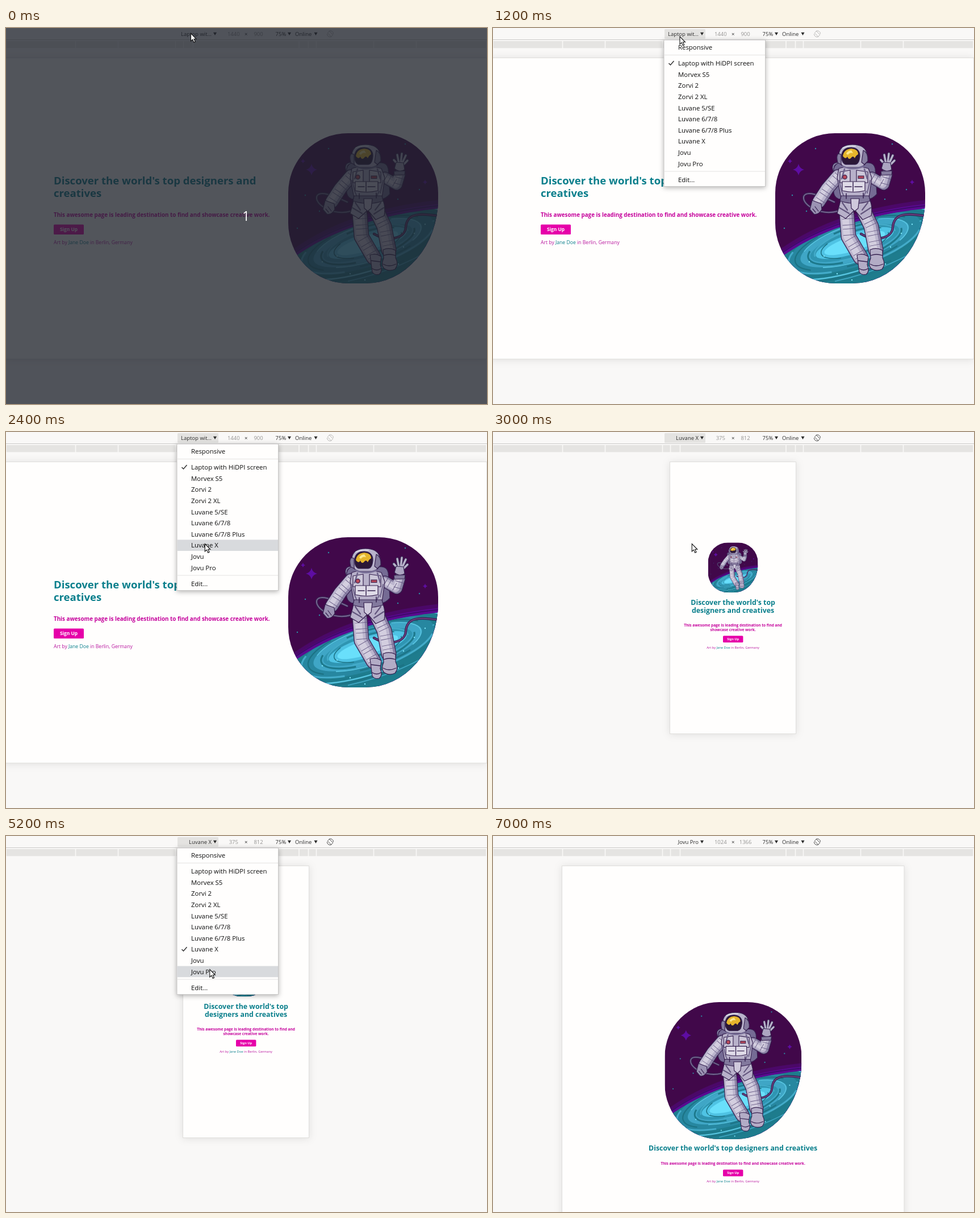
Animation, 847 px wide and 661 px high, one loop 7.1 s. Source, as an HTML page:

```html
<!DOCTYPE html>
<html lang="en">
<head>
<meta charset="utf-8">
<title>Responsive page preview</title>
<style>
  html, body { margin: 0; height: 100%; overflow: hidden; background: #f9f8f7; }
  svg { display: block; width: 100vw; height: 100vh; font-family: "Open Sans", "Noto Sans", sans-serif; }
  .bar { font-size: 9.5px; font-weight: 500; fill: #2b2b2b; }
  .bar .dim { fill: #949392; text-anchor: middle; }
  .end { text-anchor: end; }
  .mid { text-anchor: middle; }
  .sheet { fill: #fffefd; stroke: #dfdedc; filter: drop-shadow(0 1px 7px rgba(0, 0, 0, .1)); }
  .head { font-weight: 700; fill: #0a7f8c; }
  .sub { font-weight: 700; fill: #c5009b; }
  .label { font-weight: 700; fill: #fff; text-anchor: middle; }
  .credit { fill: #b9179f; }
  .credit tspan { fill: #0a7f8c; }
  .menu { font-size: 11.4px; font-weight: 500; fill: #0c0c0c; }
  .menu .box { fill: #fffefd; stroke: #c9c8c7; filter: drop-shadow(0 2px 4px rgba(0, 0, 0, .3)); }
  .line { fill: none; stroke-linecap: round; stroke-linejoin: round; }
  .ink { stroke: #35204f; stroke-width: 1.2; stroke-linejoin: round; }
</style>
</head>
<body>
<svg id="stage" viewBox="0 0 847 661"></svg>
<script>
const LOOP = 7100;
const INK = '#35204f';

const line = (d, color, width, extra = '') =>
  `<path class="line" d="${d}" stroke="${color}" stroke-width="${width}" ${extra}/>`;

const shape = (d, fill) => `<path class="ink" d="${d}" fill="${fill}"/>`;

const dot = (x, y, r, fill) => `<circle cx="${x}" cy="${y}" r="${r}" fill="${fill}"/>`;

const text = (x, y, content, cls = '', size = '') =>
  `<text x="${x}" y="${y}" class="${cls}" ${size && `font-size="${size}"`}>${content}</text>`;

const tube = (d, color) => line(d, INK, 4.4) + line(d, color, 2);

// A padded suit limb: outline, shaded body, lit side and uneven creases across it.
const limb = (d, w) =>
  line(d, INK, w) + line(d, '#8b82a6', w - 2.4) +
  line(d, '#bcb6ce', w - 7, 'transform="translate(-2 -.5)"') +
  line(d, '#d3cedf', w - 15, 'transform="translate(-3 -.5)"') +
  line(d, '#655883', w - 6, 'stroke-dasharray=".9 6 .9 10" style="stroke-linecap:butt" transform="translate(1.5 0)"');

const sparkle = (x, y, r) =>
  `<path fill="#5e0da3" d="M${x} ${y - r}Q${x + r * .2} ${y - r * .2} ${x + r} ${y}Q${x + r * .2} ${y + r * .2} ${x} ${y + r}` +
  `Q${x - r * .2} ${y + r * .2} ${x - r} ${y}Q${x - r * .2} ${y - r * .2} ${x} ${y - r}Z"/>`;

function space() {
  const rim = 'M490 416Q590 335 765 317V455H490Z';
  const oval = (rx, ry, paint) => `<ellipse cx="637" cy="378" rx="${rx}" ry="${ry}" ${paint}/>`;
  let swirl = oval(122, 41, 'fill="#2787a0"') + oval(100, 31, 'fill="#3fa6c6"') +
    oval(82, 23, 'fill="#2f95b2"') + oval(72, 18, 'fill="#4fc3e4"') + oval(56, 13, 'fill="#69dffb"');
  const colors = ['#1c7385', '#43abc9', '#1d798c', '#59c6e2'];
  for (let i = 0; i < 11; i++) {
    const rx = 62 + i * 12;
    swirl += oval(rx, rx * .33, `fill="none" stroke="${colors[i % 4]}" stroke-width="${1.6 + i % 3 * .8}"
      stroke-dasharray="${60 + i * 9} ${40 + i * 6}" stroke-dashoffset="${i * 67}"`);
  }
  const stars = [[527, 294], [513, 352], [703, 204], [728, 284], [568, 212], [552, 322], [690, 301]];
  const specks = [[583, 401], [606, 432], [632, 443], [700, 385], [719, 361], [691, 415], [557, 411], [738, 345]];
  return `<rect x="497" y="185" width="264" height="264" fill="#41084a"/>
    <path d="${rim}" fill="#4b0868" transform="translate(0 -15)"/>
    <path d="${rim}" fill="#5a0a90" transform="translate(0 -8)"/>
    ${line('M500 402Q595 329 765 312', '#3d0a68', 2)}
    <path d="${rim}" fill="#1e7c8d"/>
    <clipPath id="planet"><path d="${rim}"/></clipPath>
    <g clip-path="url(#planet)"><g transform="rotate(-18 637 378)">${swirl}</g></g>
    ${sparkle(538, 249, 10)}${sparkle(523, 234, 4)}${sparkle(738, 271, 4.5)}
    ${stars.map(([x, y]) => dot(x, y, 1.2, '#2b8fa5')).join('')}
    ${specks.map(([x, y]) => dot(x, y, 1.2, '#7be4f5')).join('')}`;
}

function astronaut() {
  const fingers = 'M693 243L683 232M692 239L689 223M695 238L697 221M697 239L704 224M698 242L707 233';
  return tube('M607 322C577 330 545 312 547 297C550 284 578 295 601 306', '#75648f') +
    tube('M612 262C594 250 597 237 608 238', '#8d84a8') +
    tube('M648 362C672 376 703 371 704 350C706 327 724 324 765 331', '#6a3f80') +
    shape('M600 247Q603 237 612 237H662Q671 238 673 247L676 292Q668 301 660 301H612Q602 300 600 290Z', '#756b94') +
    limb('M608 260L589 282L574 305', 24) +
    limb('M667 263L688 275L693 258', 21) +
    line(fingers, INK, 5.6) + line(fingers, '#b9b3cb', 3.4) +
    shape('M684 247L687 236L700 237L702 249Q693 255 684 247Z', '#aca5c1') +
    shape('M683 252L703 251L702 258L684 259Z', '#857c9f') +
    shape('M562 303L578 309L579 319Q573 329 565 327L558 319Z', '#9b93b3') +
    line('M563 318L568 324M567 314L573 322', INK, 1.2) +
    limb('M654 324L666 349L674 390', 27) +
    limb('M623 328L626 367L647 403', 27) +
    shape('M664 390Q675 385 686 391L686 404Q692 416 685 424Q674 429 665 422Q660 416 665 405Z', '#b3acc6') +
    shape('M641 399Q651 395 661 402L659 416Q664 428 657 433Q649 435 645 429L643 414Z', '#b3acc6') +
    line('M664 415Q674 421 687 415M645 423Q653 428 660 423M665 400Q675 396 686 400M643 409L659 411', INK, 1.3) +
    shape('M609 247Q634 239 661 247L667 263L662 299Q669 312 666 330L651 337L637 320L621 335L606 326Q610 312 613 299L606 263Z', '#b8b1ca') +
    line('M609 268L615 290M664 268L659 290M614 287L620 301M657 287L650 301', '#6f648c', 2) +
    shape('M613 295L662 295L664 304Q638 313 611 304Z', '#82799d') +
    shape('M630 300H645L643 317L637 322L631 317Z', '#cfc9dc') +
    line('M610 316L627 326M665 316L648 327M615 307L624 320M660 307L650 320', '#64577f', 2.2) +
    shape('M611 253L629 250V272H611ZM640 250L660 253V272H640Z', '#ccc7d9') +
    shape('M615 270H655V286Q635 291 615 286Z', '#dfdbe8') +
    line('M620 279H631M637 279H650M634 271V287M622 291V300M652 290V299', INK, 1.5) +
    line('M619 248L614 265M654 248L659 265', '#6f648c', 2.6) +
    dot(619.5, 262, 4.3, INK) + dot(619.5, 262, 3.1, '#b94a5b') +
    `<rect x="643" y="260" width="10" height="4.5" fill="#b14659" stroke="${INK}"/>` +
    shape('M609 222Q611 205 633 205Q657 205 659 224Q660 242 645 245H621Q608 241 609 222Z', '#b9b3cb') +
    line('M616 211Q624 206.5 638 207.5', '#e2dfea', 1.8) +
    shape('M608 221Q604 224 607 237L613 240V222ZM652 215Q661 219 660 234L654 240L649 236Z', '#857c9f') +
    shape('M614 223Q616 210 631 210Q646 211 646 225Q645 239 638 240H621Q613 237 614 223Z', '#2b1737') +
    '<path fill="#e5b52c" d="M616 225Q618 213 631 212Q643 213 643 222Q639 224 637 229Q634 223 630 229Q626 232 624 226Q621 232 616 225Z"/>' +
    '<path fill="#fbe78d" d="M622 221Q624 216 631 215L634 220Q628 218 625 223Z"/>' +
    line('M616 243Q633 251 652 243', '#756b94', 3);
}

const artwork = `<defs>
  <clipPath id="blob"><path d="M602 185H656A105 105 0 0 1 761 290V300A128 149 0 0 1 633 449H603A106 106 0 0 1 497 343V290A105 105 0 0 1 602 185Z"/></clipPath>
  <g id="art" clip-path="url(#blob)">${space()}${astronaut()}</g></defs>`;

function page(p) {
  const align = p.centered ? 'mid' : '';
  const rows = (list, cls, size) => list.map(([y, s]) => text(p.textX, y, s, `${cls} ${align}`, size)).join('');
  const [bx, by, bw, bh] = p.button;
  const [ax, ay, scale] = p.art;
  return `<g class="page">
    <rect class="sheet" x="${p.sheet[0]}" y="52.5" width="${p.sheet[1]}" height="${p.sheet[2]}"/>
    <use href="#art" transform="translate(${ax} ${ay}) scale(${scale}) translate(-497 -185)"/>
    ${rows(p.head, 'head', p.sizes[0])}${rows(p.sub, 'sub', p.sizes[1])}
    <rect x="${bx}" y="${by}" width="${bw}" height="${bh}" rx="1.5" fill="#e600a9"/>
    ${text(bx + bw / 2, by + bh / 2 + p.sizes[2] * .36, 'Sign Up', 'label', p.sizes[2])}
    ${rows([[p.creditY, 'Art by <tspan>Jane Doe</tspan> in Berlin, Germany']], 'credit', p.sizes[3])}
  </g>`;
}

const small = { centered: true, textX: 422.6, sizes: [12.38, 6.56, 5.65, 5.78] };
const pages = [
  { sheet: [-4, 850.5, 529.5], art: [497, 185, 1], textX: 84, sizes: [18.56, 9.81, 8.4, 8.63],
    head: [[274.5, "Discover the world's top designers and"], [296.5, 'creatives']],
    sub: [[332.3, 'This awesome page is leading destination to find and showcase creative work.']],
    button: [84, 345.5, 53, 17.5], creditY: 380.3 },
  { ...small, sheet: [311.5, 222, 478], art: [378.6, 194.3, .3333],
    head: [[303.5, "Discover the world's top"], [317.7, 'designers and creatives']],
    sub: [[341.7, 'This awesome page is leading destination to find and'], [349.7, 'showcase creative work.']],
    button: [405, 358.3, 35.4, 11.7], creditY: 381.2 },
  { ...small, sheet: [121.5, 602.5, 640], art: [302.4, 292, .913],
    head: [[553.3, "Discover the world's top designers and creatives"]],
    sub: [[577.9, 'This awesome page is leading destination to find and showcase creative work.']],
    button: [405, 586.5, 35.4, 11.7], creditY: 609.2 },
];

const devices = ['Laptop with HiDPI screen', 'Morvex S5', 'Zorvi 2', 'Zorvi 2 XL', 'Luvane 5/SE',
  'Luvane 6/7/8', 'Luvane 6/7/8 Plus', 'Luvane X', 'Jovu', 'Jovu Pro'];
const RESPONSIVE = -1, NONE = -2;
const rowY = i => i === RESPONSIVE ? 33.6 : 62 + i * 19.6;

const screens = [
  { name: 'Laptop wit…', size: [1440, 900], row: 0, icon: '#b5b4b3' },
  { name: 'Luvane X', size: [375, 812], row: 7, icon: '#444' },
  { name: 'Jovu Pro', size: [1024, 1366], row: 9, icon: '#444' },
];

const ruler = [0, 122.5, 197.5, 298.5, 312.5, 329.5, 516, 532.5, 546.5, 647.5, 722.5, 846];
const arrow = x => `<path d="M${x - 3} 7.8H${x + 3}L${x} 13Z"/>`;

const toolbar = `<g class="bar">
  <path d="M0 20.5H847" stroke="#cbcac9"/>
  ${ruler.slice(1).map((x, i) => `<rect x="${ruler[i] + .8}" y="23" width="${x - ruler[i] - 1.6}" height="12.3" fill="#e5e4e2"/>`).join('')}
  <rect id="hover" x="302" y="2" width="72" height="17" rx="1.5" fill="#e4e3e1"/>
  <text id="device" class="end" x="362" y="14"></text>${arrow(368)}
  <text id="width" class="dim" x="400.8" y="14"></text>${text(422.7, 14, '×', 'mid')}
  <text id="height" class="dim" x="444.6" y="14"></text>
  ${text(493.3, 14, '75%', 'end')}${arrow(499)}${text(538.3, 14, 'Online', 'end')}${arrow(545.5)}
  <g id="rotate" fill="none" stroke-width=".9" transform="rotate(45 571 10.3)">
    <rect x="566.4" y="8" width="9.2" height="4.6" rx="1"/>
    <path d="M566 8.5A5.3 5.3 0 0 1 575 6.5M576 12.2A5.3 5.3 0 0 1 567 14.2"/>
  </g></g>`;

const menu = `<g id="menu" class="menu">
  <rect class="box" x="301" y="21" width="178.5" height="257.5"/>
  <rect id="row" x="301.5" width="177.5" height="19.6" fill="#d8dadd"/>
  <path d="M301.5 47.5H479M301.5 252H479" stroke="#e3e2e1"/>
  ${text(326, 37.8, 'Responsive')}${text(326, 270.6, 'Edit…')}
  ${devices.map((name, i) => text(326, rowY(i) + 4.1, name)).join('')}
  <path id="check" d="M309.5 0L312.5 3L318.5 -4" fill="none" stroke="#333" stroke-width="1.5"/></g>`;

const stage = document.getElementById('stage');
stage.innerHTML = artwork + pages.map(page).join('') + toolbar + menu +
  `<g id="intro"><rect width="847" height="661" fill="#1e222b" fill-opacity=".77"/>
   ${text(422.5, 339, '1', 'mid', 23).replace('<text', '<text fill="#fff"')}</g>
   <path id="cursor" d="M0 0V13.4L3.1 10.6L5.4 15.8L7.7 14.8L5.5 9.8H9.5Z" fill="#fff" stroke="#111" stroke-width="1.1"/>`;

const part = Object.fromEntries([...stage.querySelectorAll('[id]')].map(el => [el.id, el]));
const pageNodes = [...stage.querySelectorAll('.page')];

// Each timeline holds [start in ms, value...] and jumps from entry to entry.
const cursorPath = [
  [0, 325.5, 9.5], [1200, 329, 15], [1300, 332, 25], [1500, 334, 50], [1600, 336, 88], [1700, 338.5, 128.5],
  [1800, 344, 171], [2000, 347, 204], [2300, 349, 200], [2400, 350.3, 196.5], [3300, 352, 184], [3400, 353.5, 165],
  [3600, 360, 130], [3700, 366, 85], [3800, 370, 45], [4000, 368, 30], [4100, 362, 17], [4200, 356.8, 8.8],
  [4800, 354, 80], [4900, 352, 172], [5100, 356, 210], [5200, 358.8, 234.5], [6200, 300, 190], [6300, 220, 130],
  [6400, 150, 75], [6500, 100, 30], [6600, 72, 5], [6900, 72, 3], [7000, -50, -50],
];
const highlights = [[0, NONE], [1300, RESPONSIVE], [1500, 1], [1600, 3], [1700, 5], [1800, 7], [2000, 8], [2300, 7],
  [2900, NONE], [4800, 3], [4900, 7], [5100, 8], [5200, 9], [5700, NONE]];
const screenTimes = [[0, 0], [3000, 1], [5800, 2]];
const menuTimes = [[0, false], [600, true], [2900, false], [4400, true], [5700, false]];

const at = (timeline, t) => timeline.findLast(entry => entry[0] <= t).slice(1);
const show = (el, visible) => el.setAttribute('visibility', visible ? 'visible' : 'hidden');

function draw(t) {
  const [index] = at(screenTimes, t), [row] = at(highlights, t), [open] = at(menuTimes, t);
  const screen = screens[index];
  pageNodes.forEach((node, i) => { node.style.display = i === index ? '' : 'none'; });
  part.device.textContent = screen.name;
  part.width.textContent = screen.size[0];
  part.height.textContent = screen.size[1];
  part.rotate.setAttribute('stroke', screen.icon);
  part.menu.style.display = open ? '' : 'none';
  part.check.setAttribute('transform', `translate(0 ${rowY(screen.row)})`);
  part.row.setAttribute('y', rowY(row) - 9.8);
  show(part.row, row !== NONE);
  show(part.intro, t < 500);
  show(part.hover, t >= 500 && t < 6900);
  part.cursor.setAttribute('transform', `translate(${at(cursorPath, t)})`);
}

function tick() {
  draw(performance.now() % LOOP);
  requestAnimationFrame(tick);
}
tick();
</script>
</body>
</html>
```
